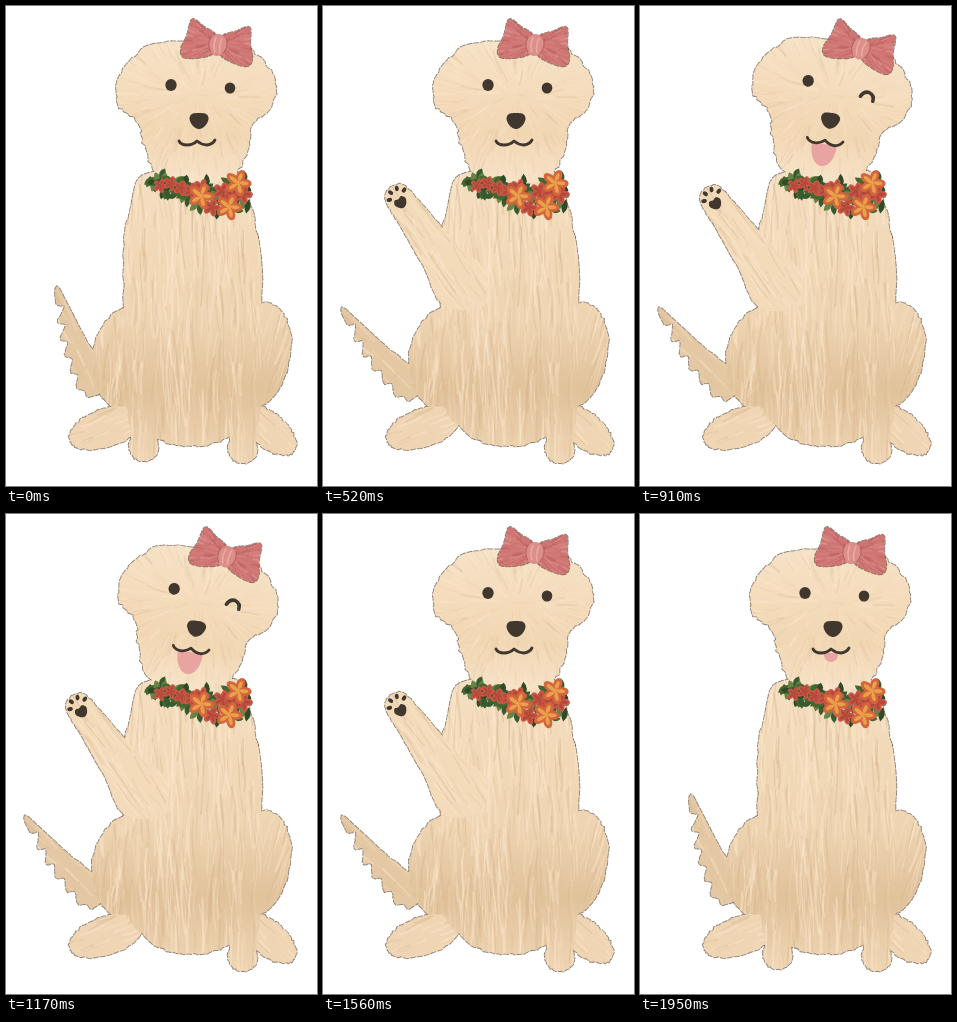
Recreate the animation shown at these times as an HTML page with a canvas. Size 311 by 480 pixels, loop 2080 ms.

```html
<!DOCTYPE html>
<html lang="en">
<head>
<meta charset="utf-8">
<title>Waving dog</title>
<style>
html, body { margin: 0; width: 100%; height: 100%; overflow: hidden; background: #fff; }
canvas { display: block; width: 100vw; height: 100vh; }
</style>
</head>
<body>
<canvas id="stage" width="311" height="480"></canvas>
<script>
const ctx = document.getElementById('stage').getContext('2d');
const STEP = 130, DEG = Math.PI / 180;
const INK = '#40372f', LIGHT = '#fbe7cd', TAN = '#d4b38b';

function random(seed) {
  return () => {
    seed = (seed * 16807) % 2147483647;
    return seed / 2147483647;
  };
}

// Key points for a symmetric shape, given its right half from top to bottom.
const mirror = (cx, half) => [
  ...half.map(([x, y]) => [cx + x, y]),
  ...half.filter(([x]) => x).reverse().map(([x, y]) => [cx - x, y])
];

function ring(cx, cy, rx, ry, degrees = 0) {
  const c = Math.cos(degrees * DEG), s = Math.sin(degrees * DEG);
  return Array.from({ length: 12 }, (_, i) => {
    const u = rx * Math.cos(i * 30 * DEG), v = ry * Math.sin(i * 30 * DEG);
    return [cx + u * c - v * s, cy + u * s + v * c];
  });
}

// Closed Catmull-Rom curve through the keys, optionally ragged like fur.
function outline(keys, rough = 0) {
  const path = new Path2D(), rnd = random(31), n = keys.length, samples = 6;
  for (let i = 0; i < n; i++) {
    const [a, b, c, d] = [-1, 0, 1, 2].map(k => keys[(i + k + n) % n]);
    for (let j = 0; j < samples; j++) {
      const t = j / samples;
      const [x, y] = [0, 1].map(k => b[k] + t / 2 * (c[k] - a[k]
        + t * (2 * a[k] - 5 * b[k] + 4 * c[k] - d[k] + t * (3 * (b[k] - c[k]) + d[k] - a[k])))
        + (rnd() - 0.5) * rough);
      path.lineTo(x, y);
    }
  }
  path.closePath();
  return path;
}

function shade(y0, y1, ...colors) {
  const g = ctx.createLinearGradient(0, y0, 0, y1);
  colors.forEach((c, i) => g.addColorStop(i / (colors.length - 1), c));
  return g;
}

// A furry body part; hair is { angle, length, density, strength }.
function part(keys, hair, fill, rough = 2) {
  const xs = keys.map(k => k[0]), ys = keys.map(k => k[1]);
  const box = [Math.min(...xs), Math.min(...ys), Math.max(...xs), Math.max(...ys)];
  return { path: outline(keys, rough), box, fill, hair: { length: 50, density: 1, strength: 1, ...hair } };
}

const bodyFill = shade(170, 455, '#f5dfc2', '#f1d9b7', '#eed4b1', '#e0c29b', '#efd5b3');
const lean = degrees => ({ angle: () => degrees * DEG });

function tailKeys() {
  const keys = [[-14, 4], [12, 0], [8, -32], [4, -60], [0, -110]];
  for (let along = 95; along > 8; along -= 17) {
    const depth = 22 * (1 - (along / 110) ** 3);
    keys.push([-depth, -along], [6 - depth, 6 - along]);
  }
  return keys;
}

const legHalf = [[0, 215], [15, 232], [19, 300], [17, 400], [13, 426], [15, 444], [8, 453], [0, 455]];
const tail = part(tailKeys(), { ...lean(-92), length: 28 }, '#e4c8a3', 1);
const legDown = part(mirror(138, legHalf), lean(91), bodyFill);
const armUp = part(mirror(0, [[0, -12], [9, -9], [13, 0], [15, 20], [18, 50], [21, 75], [28, 110], [14, 130], [0, 133]]),
  lean(92), '#f3dbba', 1);
const head = part(mirror(-3, [[0, -63], [40, -59], [62, -47], [76, -29], [80, -13], [74, 7],
  [57, 20], [52, 43], [40, 70], [16, 80], [0, 80]]),
  { angle: (x, y) => Math.atan2(y + 8, x * 0.7), length: 20, density: 1.5, strength: 0.6 },
  shade(-63, 80, '#f6e2c7', '#f4dcbc', '#f1d6b2', '#f7e3c8'), 3);
const body = [
  part(ring(132, 355, 46, 56), lean(94), bodyFill),
  part(ring(251, 350, 33, 54, 12), lean(106), bodyFill),
  part(ring(100, 422, 38, 19, -18), { ...lean(158), length: 24 }, '#efd5b3'),
  part(ring(262, 424, 34, 17, 40), { ...lean(45), length: 24 }, '#efd5b3'),
  part(mirror(185, [[0, 165], [48, 168], [60, 200], [67, 240], [67, 300], [69, 350], [67, 395],
    [45, 425], [20, 438], [0, 440]]), { ...lean(89), length: 66 }, bodyFill),
  part(mirror(237, legHalf.map(([x, y]) => [x, y + 2])), lean(89), bodyFill)
];

function at(x, y, degrees, draw) {
  ctx.save();
  ctx.translate(x, y);
  ctx.rotate(degrees * DEG);
  draw();
  ctx.restore();
}

// Speckled rim; fills painted later leave only the outer silhouette.
function rim({ path }) {
  ctx.strokeStyle = 'rgba(75,52,32,.6)';
  ctx.lineWidth = 2;
  ctx.setLineDash([1, 1.5, 2, 2.5]);
  ctx.stroke(path);
  ctx.setLineDash([]);
}

function coat({ path, box: [x0, y0, x1, y1], fill, hair }, colors = [TAN, LIGHT, LIGHT]) {
  const rnd = random(4711), count = (x1 - x0) * (y1 - y0) / 110 * hair.density;
  ctx.save();
  ctx.fillStyle = fill;
  ctx.fill(path);
  ctx.clip(path);
  for (let i = 0; i < count; i++) {
    const x = x0 + rnd() * (x1 - x0), y = y0 + rnd() * (y1 - y0);
    const a = hair.angle(x, y) + (rnd() - 0.5) * 0.22, l = hair.length * (0.5 + rnd() * 0.7);
    const bend = (rnd() - 0.5) * l * 0.25, dx = Math.cos(a), dy = Math.sin(a);
    ctx.strokeStyle = colors[i % colors.length];
    ctx.globalAlpha = (0.12 + rnd() * 0.38) * hair.strength;
    ctx.lineWidth = 0.8 + rnd() * 1.6;
    ctx.beginPath();
    ctx.moveTo(x - dx * l / 2, y - dy * l / 2);
    ctx.quadraticCurveTo(x - dy * bend, y + dx * bend, x + dx * l / 2, y + dy * l / 2);
    ctx.stroke();
  }
  ctx.restore();
}

function oval(x, y, rx, ry, color, angle = 0) {
  ctx.fillStyle = color;
  ctx.beginPath();
  ctx.ellipse(x, y, rx, ry, angle, 0, 7);
  ctx.fill();
}

function fill(keys, color) {
  ctx.fillStyle = color;
  ctx.fill(outline(keys));
}

function line(d, width, color = INK) {
  ctx.strokeStyle = color;
  ctx.lineWidth = width;
  ctx.stroke(new Path2D(d));
}

function drawPad() {
  fill(mirror(-1, [[0, 2], [4, 1], [6.5, 5], [4, 10], [0, 12]]), INK);
  for (let i = 0; i < 4; i++) {
    const a = (46 * i - 157) * DEG;
    oval(9.5 * Math.cos(a), 1 + 9.5 * Math.sin(a), 2.8, 2, INK, a);
  }
}

const bowLoop = part([[3, -8], [16, -15], [29, -21], [32, -4], [36, 10], [32, 18], [16, 16], [3, 9]],
  { angle: (x, y) => Math.atan2(y, x), length: 14, density: 4 }, '#cf7674', 0);

function drawBow() {
  for (const side of [-1, 1]) {
    ctx.save();
    ctx.scale(side, 1);
    rim(bowLoop);
    coat(bowLoop, ['#e6a39d', '#b0555a']);
    ctx.restore();
  }
  oval(0, 1, 9, 11, '#dc8f8a');
  line('M-8 -6Q-11 2 -6 9M8 -6Q11 2 6 9', 1, '#b5605f');
  line('M-3 -6Q-5 2 -2 8M3 -6Q1 2 3 8', 1.6, '#e8aaa3');
}

function drawFace(wink, tongue) {
  oval(-28, -18, 5.7, 5.9, INK);
  if (wink) line('M26 -11Q29 -17 34 -16Q40 -14 39 -8', 3.6);
  else oval(31, -15, 5.3, 5.5, INK);
  fill(mirror(0, [[0, 10], [7, 11], [9.5, 16], [6, 23], [0, 26]]), INK);
  if (tongue) {
    const [rx, ry] = tongue;
    ctx.save();
    ctx.beginPath();
    ctx.rect(-30, 42, 60, 40);
    ctx.clip();
    oval(-2, 44, rx, ry, '#e8a4a0');
    ctx.restore();
  }
  line('M-20 38Q-18 42 -12 42Q-6 42 -2 38Q3 42 8 42Q14 41 16 37', 2.8);
}

function leaf(x, y, angle, length, color) {
  at(x, y, angle, () => {
    ctx.fillStyle = color;
    ctx.fill(new Path2D(`M0 0Q${length / 2} -6 ${length} 0Q${length / 2} 6 0 0Z`));
  });
}

function flower(x, y, r, petal, heart) {
  for (let i = 0; i < 5; i++) {
    const a = i * 72 * DEG - 1.2, c = Math.cos(a) * r, s = Math.sin(a) * r;
    oval(x + c * 0.55, y + s * 0.55, r * 0.5, r * 0.34, petal, a);
    oval(x + c * 0.4, y + s * 0.4, r * 0.4, r * 0.15, heart, a);
  }
}

// The garland sags and widens from left to right.
function drawCollar() {
  const rnd = random(2024), greens = ['#2f4a26', '#46652f', '#668445', '#385a31'];
  const spot = t => [144 + 98 * t, 173 + 20 * Math.sin(t * 90 * DEG) + (rnd() - 0.5) * (6 + 30 * t)];
  for (let i = 0; i < 110; i++) {
    leaf(...spot(i / 110), rnd() * 360, 9 + rnd() * 6, greens[i % 4]);
  }
  for (let i = 0; i < 9; i++) flower(...spot((i + 1) / 9.5), 7 + i / 3, '#c65746', '#b24739');
  for (const [x, y] of [[195, 190], [232, 177], [223, 201]]) flower(x, y, 13, '#d3653f', '#e9a049');
}

function draw({ wag, up = true, tilt = 0, wink = false, tongue }) {
  ctx.fillStyle = '#fff';
  ctx.fillRect(0, 0, 311, 480);
  ctx.lineCap = ctx.lineJoin = 'round';
  for (const paint of [rim, coat]) {
    at(95, 382, -23 - wag, () => paint(tail));
    body.forEach(p => paint(p));
    if (up) at(75 - tilt / 4, 191 + tilt / 8, -36, () => {
      paint(armUp);
      drawPad();
    });
    else paint(legDown);
    at(193, 97, tilt, () => paint(head));
  }
  at(193, 97, tilt, () => {
    drawFace(wink, tongue);
    at(19, -59, 8, drawBow);
  });
  drawCollar();
}

const sit = { wag: 0, up: false }, sitHappy = { ...sit, tongue: [7, 7] };
const wave = wag => ({ wag });
const tilted = { wag: 32, tilt: 9 };
const winking = wag => ({ wag, tilt: 9, wink: true, tongue: [12.5, 20] });
const poses = [
  sit, sitHappy, sitHappy, wave(8), wave(20), tilted, winking(32), winking(20),
  winking(8), winking(20), winking(32), tilted, wave(20), wave(8), sit, sitHappy
];

let shown = -1;
const start = performance.now();
function tick() {
  const step = Math.floor((performance.now() - start) / STEP) % poses.length;
  if (step !== shown) draw(poses[shown = step]);
  requestAnimationFrame(tick);
}
tick();
</script>
</body>
</html>
```
